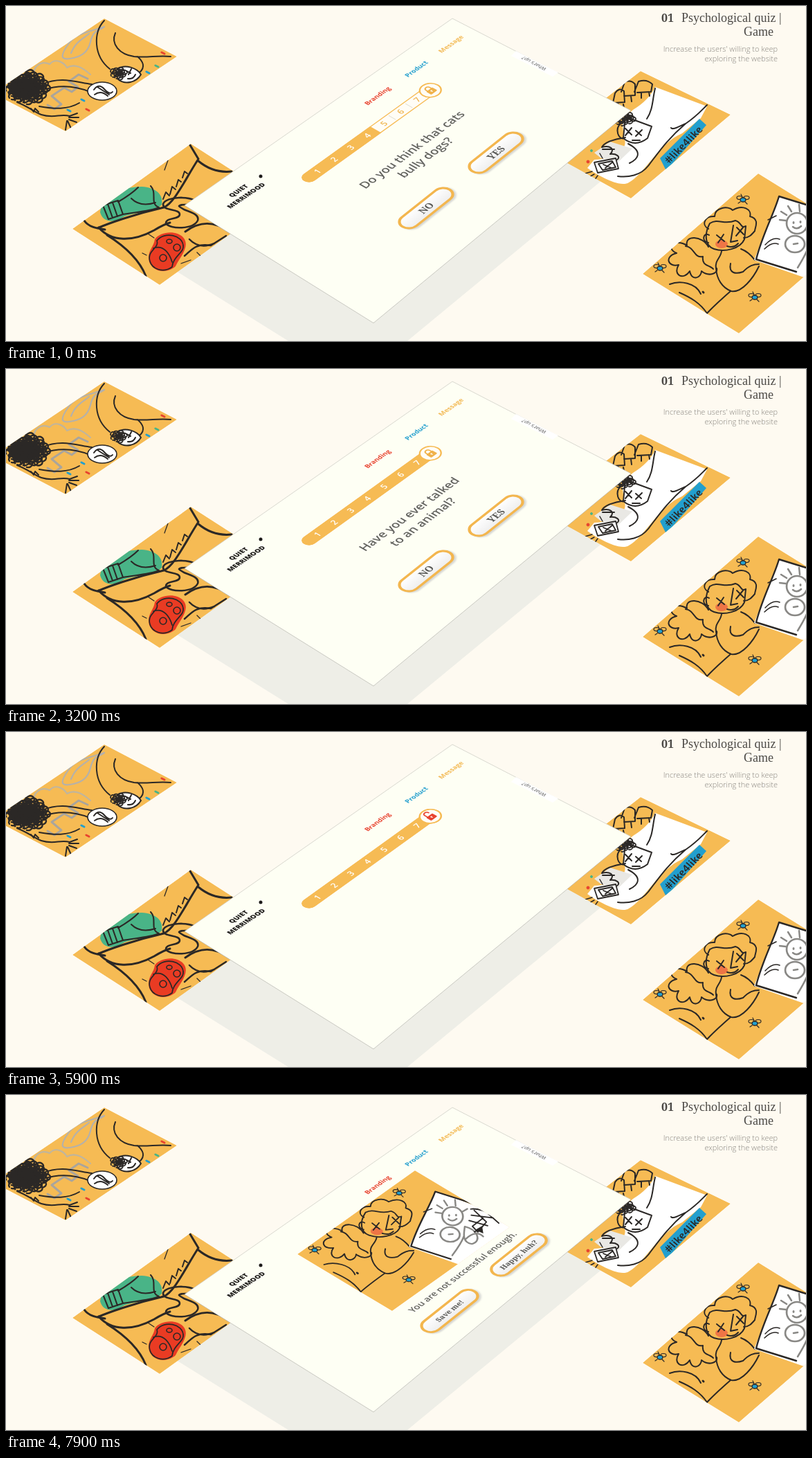
Recreate the animation shown at these times as an HTML page. Size 1156x484 px, loop 8 s.

```html
<!DOCTYPE html>
<html lang="en">
<head>
<meta charset="utf-8">
<title>Psychological quiz</title>
<style>
html, body { margin: 0; width: 100%; height: 100%; overflow: hidden; background: #fefaf1; }
svg { display: block; width: 1156px; height: 484px; }
text { font-family: "Open Sans", "Noto Sans", sans-serif; }
.mid { text-anchor: middle; }
.serif { font-family: "Liberation Serif", serif; }
.slab { font-family: "Noto Serif", serif; font-weight: 900; }
.ink { fill: none; stroke-linecap: round; stroke-linejoin: round; }
</style>
</head>
<body>
<svg id="stage" viewBox="0 0 1156 484"></svg>
<script>
const ORANGE = '#f6bb54', INK = '#2b2826', RED = '#e8432f', BLUE = '#229fce', GREY = '#62625f', PENCIL = '#898885';

// Places a flat item on the tilted page; a is the slope of its baseline in degrees.
const at = (x, y, a = 37) => {
  const r = a * Math.PI / 180;
  return `matrix(${Math.cos(r)} ${-Math.sin(r)} .87 .5 ${x} ${y})`;
};
const label = (str, size, attrs = '', x = 0, y = size * .34, kind = '') =>
  `<text class="mid ${kind}" x="${x}" y="${y}" font-size="${size}" ${attrs}>${str}</text>`;
const flat = (x, y, a, body, attrs = '') => `<g transform="${at(x, y, a)}" ${attrs}>${body}</g>`;
const ink = (d, w = 2, c = INK) => `<path class="ink" d="${d}" stroke="${c}" stroke-width="${w}"/>`;
const fill = (d, c) => `<path d="${d}" fill="${c}"/>`;
const oval = (x, y, rx, ry, c = 'none', w = 1.6, s = INK) =>
  `<ellipse cx="${x}" cy="${y}" rx="${rx}" ry="${ry}" fill="${c}" stroke="${s}" stroke-width="${w}"/>`;
const picture = (id, points, body) =>
  `<clipPath id="${id}Clip"><polygon points="${points}"/></clipPath>
   <g id="${id}" clip-path="url(#${id}Clip)"><polygon points="${points}" fill="${ORANGE}"/>${body}</g>`;

// Curly hair: small loops spread evenly over an oval.
const curls = (x, y, rx, ry, n, r, w) => {
  let d = '';
  for (let i = 0; i < n; i++) {
    const a = i * 2.4, s = Math.sqrt((i + .5) / n);
    d += `M${(x + rx * s * Math.cos(a)).toFixed(1)} ${(y + ry * s * Math.sin(a)).toFixed(1)}a${r} ${r * .8} 0 1 1 ${r / 2} ${r / 3}`;
  }
  return ink(d, w);
};
const confetti = list => list.map(([x, y, c]) => ink(`M${x - 2} ${y - 1}l4 2`, 3, c)).join('');

const selfie = picture('selfie', '142,18 247,73 86,181 -19,126',
  ink('M142 30C118 38 101 39 90 55S78 78 92 76S118 69 122 52S132 37 142 30M94 68C101 50 114 46 120 40', 2.2, '#b5b1aa') +
  ink('M40 97C42 82 55 80 63 84C72 74 84 82 88 89C100 82 112 90 122 99', 2.2, '#c0b59d') +
  ink('M60 143L70 149L80 142L66 130L84 118L95 124L104 117L91 109L105 99L118 105', 3, '#aaa59c') +
  ink('M142 21C126 38 126 72 150 91M158 39C151 55 164 70 185 73C204 75 220 71 238 73M190 73C198 80 202 88 193 96') +
  ink('M165 20C190 37 215 51 240 67', 1.3) +
  fill('M160 91C170 82 190 90 194 99C188 110 172 114 163 106Z', '#fff') +
  ink('M161 91C172 83 190 90 195 99C188 111 172 114 162 106M174 94L180 97M181 91L177 99M176 105Q184 106 187 99') +
  curls(159, 99, 9, 7, 14, 4, 1.8) +
  ink('M52 113C80 101 101 110 124 113M54 121C82 112 104 117 121 124') +
  oval(139, 123, 21, 13, '#fff') + ink('M127 121Q134 111 142 120T154 124M128 128Q137 121 147 130M132 117L149 128') +
  ink('M16 139C32 145 42 154 51 157C70 163 78 155 92 159L103 155M91 161L105 161M91 164L102 168M89 166L94 177M88 166L86 179M48 145C70 149 89 150 106 140') +
  ink('M36 148L40 153L42 148L47 153') +
  oval(26, 119, 22, 15, INK, 0) + curls(26, 120, 28, 21, 60, 6, 2.4) +
  confetti([[91, 151, BLUE], [111, 136, BLUE], [118, 150, RED], [218, 87, '#49b487'], [227, 68, RED], [205, 96, BLUE]]));

const socks = picture('socks', '267,199 393,280 222,403 96,322',
  fill('M136 298C140 274 162 262 196 261C216 262 228 272 225 287C214 299 190 297 171 304C154 315 140 312 136 298Z', '#49b487') +
  fill('M207 370C203 354 214 348 215 337C223 325 250 323 258 337C265 350 250 364 245 376C233 387 213 385 207 370Z', '#e93b23') +
  ink('M113 310C119 319 130 321 143 323M132 321C146 315 184 301 228 291C244 284 259 250 278 221L266 201M278 224C290 234 307 241 326 239', 3) +
  ink('M134 320C152 341 183 341 214 324C224 318 229 315 237 313M146 331C170 346 192 365 202 390M259 326C280 311 300 310 322 326', 3) +
  ink('M140 288L148 308L169 301L162 281ZM147 286L154 306M154 284L161 304M162 283C174 276 182 271 191 262M169 301C184 298 207 297 221 291C207 286 219 270 209 260M181 278Q194 291 216 284', 2.1) +
  ink('M276 283C266 274 231 275 227 286C226 297 251 292 251 301C251 309 231 305 231 314C237 323 270 323 277 310C281 298 256 297 250 289C254 284 270 291 276 283Z', 2.6) +
  ink('M227 279L231 269L236 274M237 272L240 261L245 265M246 261L249 251L253 254M255 248L258 239L262 242', 2) +
  ink('M208 369C203 353 222 350 218 339C229 325 255 331 256 346C258 356 241 362 240 377C226 387 211 379 208 369M213 350C228 344 237 359 240 370', 1.7) +
  oval(227, 364, 5, 5) + oval(247, 349, 5, 5) + oval(236, 340, 4, 3) +
  ink('M258 361C267 354 273 342 296 346L318 332M265 337Q279 352 301 343', 2.5) +
  ink('M234 223L229 237M245 213L236 218M189 245L199 240M276 356L283 363M205 329L214 335M197 357L203 360M253 372L267 367', 1.3));

const road = picture('road', '917,94 1047,157 903,278 773,206',
  fill('M938 117L1013 145L1004 162L977 184C943 198 924 242 900 255C888 263 857 246 840 234L850 222C884 221 900 205 893 190L890 164L906 150Q929 136 938 117Z', '#fff') +
  fill('M850 212L873 196L905 206L885 225L860 220Z', '#e9e8e4') +
  ink('M938 119C934 135 935 150 926 163M1013 143C1002 154 997 160 982 170C974 173 963 180 961 176M982 170C956 192 944 210 928 231C917 245 899 248 884 246') +
  ink('M877 140L880 126Q886 117 893 123L894 139ZM892 142L893 147M884 140L886 146M889 124L894 110Q903 106 909 113L909 129L893 130M903 130L904 138M908 124L914 109Q926 105 934 113L932 124L912 125M918 125L918 133M929 124L930 130') +
  fill('M895 160L933 174L927 191Q909 205 892 191Z', '#fff') +
  ink('M895 160L933 174L927 191Q909 205 892 191ZM895 177L904 186M904 176L895 187M910 180L918 187M919 179L910 188M905 194L916 194M889 168C878 179 886 194 893 191') +
  curls(888, 164, 15, 8, 22, 4, 1.8) +
  ink('M895 190C875 193 864 198 861 204C872 201 881 206 873 214C882 213 889 218 883 222M862 207L879 207M899 199C922 211 912 222 901 227') +
  fill('M850 226L881 220L885 235L855 241Z', '#fff') +
  ink('M850 226L881 220L885 235L855 241ZM856 228L862 237L881 233L876 224ZM863 229L875 234M876 226L866 234', 1.8) +
  ink('M837 242L847 239M841 248L850 243M850 252L855 245M858 213L862 220', 1.5) +
  oval(846, 209, 1.5, 1.5, '#49b487', 1, '#49b487') + oval(841, 225, 2, 2, RED, 1, RED) +
  fill('M945 220L1002 163L1012 172L954 238Z', BLUE) +
  `<g transform="matrix(.71 -.71 .83 .43 979 201)">${label('#like4like', 16, `font-weight="600" font-style="italic" fill="${INK}"`)}</g>`);

const bee = (x, y) => oval(x - 5, y - 2, 4, 2.5, 'none', 1.2) + oval(x + 5, y - 2, 4, 2.5, 'none', 1.2) +
  oval(x, y + 1, 4, 3, BLUE, 1.4) + ink(`M${x - 4} ${y + 4}l-3 2M${x + 3} ${y + 4}l3 3M${x - 1} ${y - 3}l-2 -4`, 1.2);
const woman = picture('woman', '1087,242 1226,328 1059,473 920,387',
  bee(1065, 279) + bee(945, 378) + bee(1082, 420) +
  oval(1034, 344, 9, 6, '#ee7546', 0) +
  ink('M1015 322C1004 316 1010 303 1024 304C1024 291 1044 288 1050 295C1065 286 1078 294 1075 304C1090 308 1082 320 1082 325C1077 331 1073 335 1066 335') +
  ink('M1017 314C1008 331 1011 347 1023 351C1038 356 1061 351 1067 337L1069 318C1061 322 1064 313 1054 310C1037 317 1030 306 1017 314M1016 331C1008 325 1004 341 1015 342') +
  ink('M1027 331L1038 340M1037 330L1029 342M1051 317L1047 341L1057 339M1056 320L1066 330M1065 320L1055 332M1042 347Q1052 350 1058 343') +
  ink('M1015 348C1006 331 980 331 984 346C966 335 952 350 969 357C950 362 957 378 972 374C963 389 979 397 988 383C991 399 1005 392 1005 383C1016 392 1029 386 1027 379') +
  ink('M982 347C995 348 994 365 1007 362C1005 377 1018 374 1022 380') +
  ink('M1034 354C1033 364 1024 367 1026 379C1027 395 1035 407 1048 412C1063 415 1080 393 1088 376M1047 372C1044 386 1054 388 1065 384C1074 375 1080 373 1088 373M1062 351Q1073 355 1082 367') +
  ink('M959 402C974 396 997 400 1004 416M1012 445C1022 434 1031 426 1047 412M973 414C989 421 1003 429 1013 444') +
  ink('M1007 413L1008 414', 3) +
  fill('M1117 275L1151 286L1228 316L1228 417L1150 391L1081 367Z', '#fff') +
  ink('M1117 275C1109 302 1093 330 1084 366L1142 384M1117 275L1156 287L1226 311', 2.4) +
  ink('M1097 345Q1108 333 1118 337M1096 351Q1107 340 1116 344M1101 309L1113 303', 1.6) +
  oval(1143, 314, 15, 15, 'none', 2.7, PENCIL) + oval(1140, 344, 14, 12, 'none', 2.7, PENCIL) +
  oval(1138, 313, 1.5, 2, PENCIL, 0) + oval(1148, 312, 1.5, 2, PENCIL, 0) +
  ink('M1137 319Q1143 324 1149 318M1138 344L1144 343M1120 297L1128 302M1118 309L1127 310M1130 289L1135 297M1146 287L1147 297M1164 301L1157 306M1161 330C1179 334 1187 352 1172 358C1157 356 1160 342 1161 330M1162 351Q1177 334 1188 345M1144 378Q1157 357 1160 346', 2.5, PENCIL) +
  ink('M1169 301C1178 299 1194 304 1202 310M1170 311L1202 314M1167 320L1194 327M1174 303L1192 321L1180 338L1172 329L1187 315M1195 308L1210 322M1175 338L1182 334') +
  fill('M1176 335L1186 328L1188 340Z', INK));

const pill = (x, y, str, w, size, id = '') => flat(x, y, 38.5,
  `<rect x="${-w / 2 + 1}" y="-12" width="${w}" height="29" rx="14.5" fill="#8e8e96" opacity=".35" filter="url(#soft)"/>
   <rect x="${-w / 2 + 1.8}" y="-12.2" width="${w - 3.6}" height="24.4" rx="12.2" fill="url(#paper)" stroke="#f3b64e" stroke-width="3.6"/>` +
  (id && `<rect id="${id}" x="${-w / 2}" y="-14" width="${w}" height="28" rx="14" fill="url(#gold)" stroke="#c99a48" stroke-width=".6"/>`) +
  label(str, size, 'fill="#555552"', 0, size * .36, 'slab'));

// Progress bar
const STEP = 29.6, LOCK_X = 201;
const digits = color => [1, 2, 3, 4, 5, 6, 7].map(n =>
  label(n, 12, `font-weight="600" fill="${color}"`, (n - 1) * STEP, 4.2)).join('');
const track = 'x="-23" y="-8.5" width="224" height="17" rx="8.5"';
const lock = (id, color, shackle) => `<g id="${id}">
  <circle r="13" fill="#fffdf6" stroke="${ORANGE}" stroke-width="2"/>
  <path class="ink" d="${shackle}" stroke="${color}" stroke-width="1.8"/>
  <rect x="-5.5" y="-2" width="11" height="8.5" rx="1.3" fill="${color}"/>
  <circle cy="1.6" r="1.2" fill="#fff"/><path d="M0 1.5V4" stroke="#fff"/></g>`;
const bar = flat(450, 239, 35.7,
  `<rect ${track} fill="#fffdf6" stroke="${ORANGE}" stroke-width="1.4"/>` +
  [4.5, 5.5].map(n => `<path d="M${n * STEP} -6V6" stroke="#ddd9cc" stroke-width=".8"/>`).join('') +
  digits('#efb550') +
  `<clipPath id="done"><rect id="doneBox" x="-30" y="-10" width="0" height="20"/></clipPath>
   <g clip-path="url(#done)"><rect ${track} fill="${ORANGE}" stroke="${ORANGE}" stroke-width="1.4"/>${digits('#fff')}</g>
   <g transform="translate(${LOCK_X})">
     ${lock('shut', '#f0b24a', 'M-3.5 -2V-4A3.5 3.5 0 0 1 3.5 -4V-2')}
     ${lock('open', RED, 'M-3.5 -2V-6A3.5 3.5 0 0 1 3.5 -6')}
   </g>`, 'id="bar"');

const questions = [
  { from: -500, to: 650, press: 'yes', when: 350, x: 587, y: 208, lines: ['Do you think that cats', 'bully dogs?'] },
  { from: 650, to: 1550, press: 'yes', when: 950, x: 591, y: 205, lines: ['Have you ever behaved like a jerk only', 'because you have a bad day?'] },
  { from: 1550, to: 2600, press: 'no', when: 2000, x: 591, y: 217, lines: ['Are you kind to yourself?'] },
  { from: 2600, to: 9000, press: 'yes', when: 3500, x: 583, y: 210, lines: ['Have you ever talked', 'to an animal?'] }
];
const ask = (q, i) => flat(q.x, q.y, 36.7, q.lines.map((s, n) =>
  label(s, 17, `font-weight="600" fill="${GREY}"`, 0, 5.5 + n * 22.5)).join(''), `id="q${i}"`);
const tab = (x, y, str, color) => flat(x, y, 35.5, label(str, 9.3, `font-weight="700" fill="${color}"`));

const CARD = '645,18 903,151 531,458 258,288';
document.getElementById('stage').innerHTML = `
<defs>
  <filter id="soft" x="-20%" y="-40%" width="140%" height="190%"><feGaussianBlur stdDeviation="1.2"/></filter>
  <linearGradient id="paper" x2="0" y2="1"><stop stop-color="#fff"/><stop offset="1" stop-color="#eeeeee"/></linearGradient>
  <linearGradient id="gold" x2="0" y2="1"><stop stop-color="#dfa94b"/><stop offset=".3" stop-color="#eeb554"/><stop offset="1" stop-color="#f4be61"/></linearGradient>
</defs>
<polygon points="${CARD}" transform="translate(-25 87)" fill="#eeeee7"/>
${selfie}${socks}${road}${woman}
<polygon points="${CARD}" fill="#fefff4"/>
<path d="M258 288L645 18L903 151" fill="none" stroke="#c9c9c1" stroke-width=".7"/>
<path d="M258 288L531 458L903 151" fill="none" stroke="#aaa9a3" stroke-width=".6"/>
<polygon points="737,65 798,96 790,102 730,72" fill="#fff"/>
<g transform="matrix(-.88 -.46 .81 -.58 763 83)">${label("What's up?", 7.5, 'fill="#555"')}</g>
${tab(537, 130, 'Branding', RED)}${tab(593, 91, 'Product', BLUE)}${tab(643, 55, 'Message', '#f3ba55')}
<g fill="#1d1b1a" font-weight="800">
  ${flat(336, 267, 34, label('QUIET', 9.5))}${flat(347, 274, 34, label('MERRIMOOD', 9.5))}
  <circle cx="368" cy="246" r="2.5"/>
</g>
${bar}
<g id="quiz">${questions.map(ask).join('')}
  ${pill(708, 212, 'YES', 90, 13.5, 'yes')}${pill(607, 292, 'NO', 90, 13.5, 'no')}</g>
<g id="result">
  <use href="#woman" transform="matrix(.999 .043 -.0218 .884 -489.7 -151.6)"/>
  ${flat(660, 256, 37, label('You are not successful enough.', 12.7, `font-weight="600" fill="${GREY}"`))}
  ${pill(741, 231, 'Happy, huh?', 93, 10.3)}${pill(641, 312, 'Save me!', 95, 10.3)}
</g>
<g fill="#4b4946">
  <text class="slab" x="947" y="23" font-size="16" style="font-weight:700">01</text>
  <text class="serif" x="976" y="23" font-size="18">Psychological quiz |</text>
  <text class="serif" x="1109" y="43" font-size="18" text-anchor="end">Game</text>
</g>
<g fill="#85827c" font-size="11" font-weight="300" text-anchor="end">
  <text x="1115" y="66">Increase the users' willing to keep</text>
  <text x="1115" y="79.5">exploring the website</text>
</g>`;

const el = id => document.getElementById(id);
const ramp = (t, a, b) => Math.min(1, Math.max(0, (t - a) / (b - a)));
const fade = (id, v) => el(id).setAttribute('opacity', v);

function draw(now) {
  const t = now % 8000, pressed = { yes: 0, no: 0 };
  let filled = 3;
  questions.forEach((q, i) => {
    fade('q' + i, ramp(t, q.from, q.from + 200) * (1 - ramp(t, q.to - 200, q.to)));
    filled += ramp(t, q.from, q.from + 250);
    const p = ramp(t, q.when, q.when + 100) * (1 - ramp(t, q.to - 150, q.to));
    pressed[q.press] = Math.max(pressed[q.press], p);
  });
  fade('yes', pressed.yes);
  fade('no', pressed.no);
  el('doneBox').setAttribute('width', 30 + (filled - .5) * STEP + (filled >= 7 ? 20 : 0));
  fade('quiz', 1 - ramp(t, 3880, 4250));
  fade('open', ramp(t, 3950, 4300));
  fade('bar', 1 - ramp(t, 6000, 6400));
  fade('result', ramp(t, 6200, 6900));
  requestAnimationFrame(draw);
}
draw(performance.now());
</script>
</body>
</html>
```
